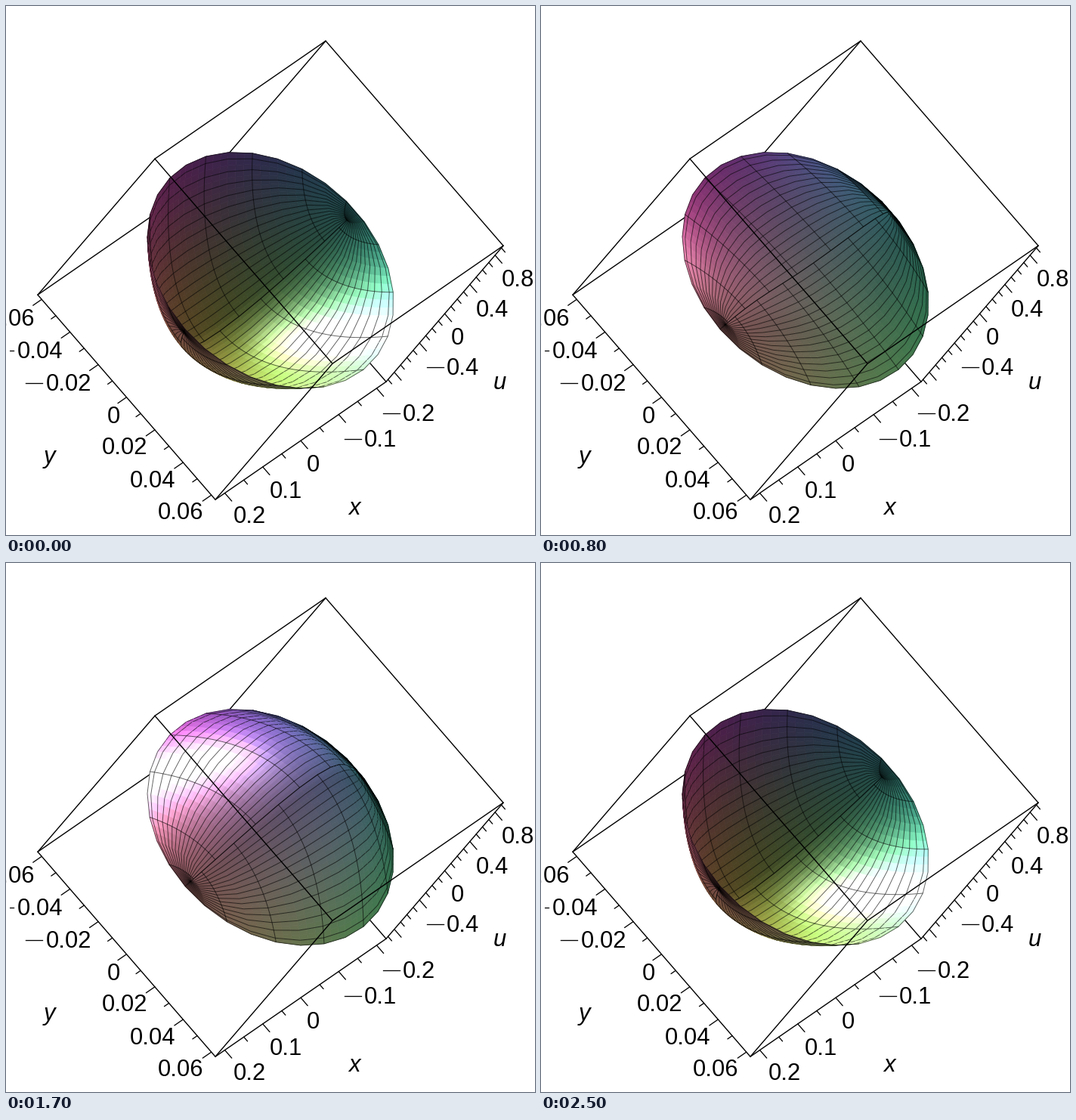
These frames come from a looping animation (700x700 px, 2.6 s). A matplotlib script:

```python
import numpy as np
import matplotlib.pyplot as plt
from matplotlib.animation import FuncAnimation
from matplotlib.collections import LineCollection, PolyCollection
from matplotlib.patches import Rectangle

SIZE, DPI, FRAMES = 700, 100, 26
PX = 72 / DPI
FONT = dict(family="Liberation Sans", fontsize=31 * PX)

# Orthographic view of the cube [-1, 1]^3 with axes (x, y, u)
CENTER = np.array([350, 349.7])
PROJ = np.array([[-113, 78], [117.5, 135.5], [77.5, -90]])
VIEW = np.array([0.648, 0.126, 0.751])
RANGE = np.array([0.225, 0.0628, 0.93])


def unit(v):
    return v / np.linalg.norm(v, axis=-1, keepdims=True)


LIGHT = unit(np.array([-0.05, -0.97, 0.11]))
HALF = unit(LIGHT + VIEW)

# Elliptic coordinates of the membrane
CELLS, SUB, ECC = 31, 3, 0.96
rim = np.arccosh(1 / ECC)
eta = np.linspace(0, 2 * np.pi, CELLS + 1)[:, None]
xi = np.linspace(0, rim, CELLS + 1)[None, :]
X = ECC * np.cosh(xi) * np.cos(eta)
Y = np.sinh(xi) / np.sinh(rim) * np.sin(eta)

steps = np.arange(CELLS * SUB + 1) / SUB
low = np.minimum(steps.astype(int), CELLS - 1)
mix = (steps - low)[:, None, None]


def project(points):
    return CENTER + np.asarray(points) @ PROJ


def refine(grid):
    return grid[low] * (1 - mix) + grid[low + 1] * mix


def membrane(frame):
    """Positions and normals at one moment of the vibration."""
    phase = 2 * np.pi * (frame - 1.1) / (FRAMES - 1)
    main, second = -np.cos(phase), 0.1 * np.sin(phase)
    bowl = 1 - X**2 - Y**2
    gain = main + second * (4 * X**2 - 1)
    slope_x = -2 * X * gain + 8 * second * X * bowl
    slope_y = -2 * Y * gain
    points = np.stack([X, Y, bowl * gain], axis=-1)
    normals = np.stack([-slope_x, -slope_y, np.ones_like(X)], axis=-1)
    return refine(points), unit(refine(normals))


def cell_mean(g):
    return (g[:-1, :-1] + g[1:, :-1] + g[1:, 1:] + g[:-1, 1:]) / 4


def shade(points, normals):
    base = 0.25 + 0.75 * (1 + points) / 2
    normals = np.where(normals @ VIEW < 0, -1, 1)[:, None] * normals
    diffuse = np.maximum(normals @ LIGHT, 0)[:, None]
    gloss = np.maximum(normals @ HALF, 0)[:, None] ** 16
    return np.clip(base * (0.48 + 0.78 * diffuse) + 0.75 * gloss, 0, 1)


def segments(points):
    around = list(range(0, CELLS, 2)) + [CELLS]
    across = np.arange(0, CELLS, 2) * SUB
    a = np.concatenate([points[:-1, around].reshape(-1, 3),
                        points[across, :-1].reshape(-1, 3)])
    b = np.concatenate([points[1:, around].reshape(-1, 3),
                        points[across, 1:].reshape(-1, 3)])
    return a, b


fig = plt.figure(figsize=(SIZE / DPI, SIZE / DPI), dpi=DPI, facecolor="white")
ax = fig.add_axes([0, 0, 1, 1])
ax.set(xlim=(0, SIZE), ylim=(SIZE, 0))
ax.axis("off")
page = Rectangle((5, 0), 690, SIZE, transform=ax.transData)


def add_lines(lines, z, width=1.4):
    ax.add_collection(LineCollection(lines, colors="black", zorder=z,
                                     linewidths=width * PX, capstyle="round"))


def draw_box():
    back, front = [], []
    for axis in range(3):
        for p in (-1, 1):
            for q in (-1, 1):
                ends = [np.insert([p, q], axis, side) for side in (-1, 1)]
                (back if p == q == -1 else front).append(project(ends))
    add_lines(back, 1)
    add_lines(front, 3)


def draw_ticks(axis, corner, out, step, every, count):
    """Ticks on the cube edge through corner, pointing along out."""
    direction = unit(np.array(out, float) @ PROJ)
    lines = []
    for k in range(-count, count + 1):
        spot = np.array(corner, float)
        spot[axis] = k * step / RANGE[axis]
        start = project(spot)
        length = 14 if k % every == 0 else 7.5
        lines.append([start, start + direction * length])
    add_lines(lines, 3, 1.3)


def label(text, right, middle, negative=False):
    t = ax.text(right + 1, middle + 11, text, ha="right", va="baseline",
                zorder=4, **FONT)
    t.set_clip_path(page)
    if negative:
        left = right - (61 if len(text) == 4 else 43) - 3
        line, = ax.plot([left - 22, left], [middle + 1] * 2, color="black",
                        lw=1.3 * PX, zorder=4)
        line.set_clip_path(page)


draw_box()
draw_ticks(0, (0, 1, -1), (0, 1, 0), 0.05, 2, 4)
draw_ticks(1, (1, 0, -1), (1, 0, 0), 0.01, 2, 6)
draw_ticks(2, (-1, 1, 0), (0, 1, 0), 0.1, 4, 9)

for item in [("0.06", 37, 412, True), ("0.04", 74, 455, True),
             ("0.02", 112, 498, True), ("0", 150, 541),
             ("0.02", 186, 582), ("0.04", 223, 626), ("0.06", 260, 668),
             ("0.2", 343, 673), ("0.1", 391, 640), ("0", 414, 605),
             ("0.1", 516, 572, True), ("0.2", 567, 538, True),
             ("0.4", 625, 477, True), ("0", 605, 437),
             ("0.4", 664, 400), ("0.8", 698, 360)]:
    label(*item)
for name, x, base in [("x", 461, 673), ("y", 58, 605), ("u", 653, 507)]:
    ax.text(x, base, name, style="italic", ha="center", va="baseline", **FONT)

surface = PolyCollection([], zorder=2)
ax.add_collection(surface)


def update(frame):
    points, normals = membrane(frame)
    flat = project(points)
    quads = np.stack([flat[:-1, :-1], flat[1:, :-1], flat[1:, 1:],
                      flat[:-1, 1:]], axis=2).reshape(-1, 4, 2)
    centers = cell_mean(points).reshape(-1, 3)
    colors = shade(centers, unit(cell_mean(normals).reshape(-1, 3)))
    colors = np.column_stack([colors, np.ones(len(colors))])

    a, b = segments(points)
    pa, pb = project(a), project(b)
    strokes = np.stack([pa, pb, pb, pa], axis=1)
    ink = np.tile([0, 0, 0, 0.62], (len(a), 1))

    # Grid lines are sorted with the facets, nudged towards the viewer
    depth = np.concatenate([centers @ VIEW, (a + b) / 2 @ VIEW + 0.06])
    order = np.argsort(depth)
    widths = np.repeat([0.5, 0.95 * PX], [len(quads), len(a)])
    surface.set_verts(np.concatenate([quads, strokes])[order])
    surface.set_facecolor(np.concatenate([colors, ink * 0])[order])
    surface.set_edgecolor(np.concatenate([colors, ink])[order])
    surface.set_linewidth(widths[order])
    return [surface]


anim = FuncAnimation(fig, update, frames=FRAMES, interval=100, repeat=True,
                     repeat_delay=0, blit=False)
plt.show()
```
